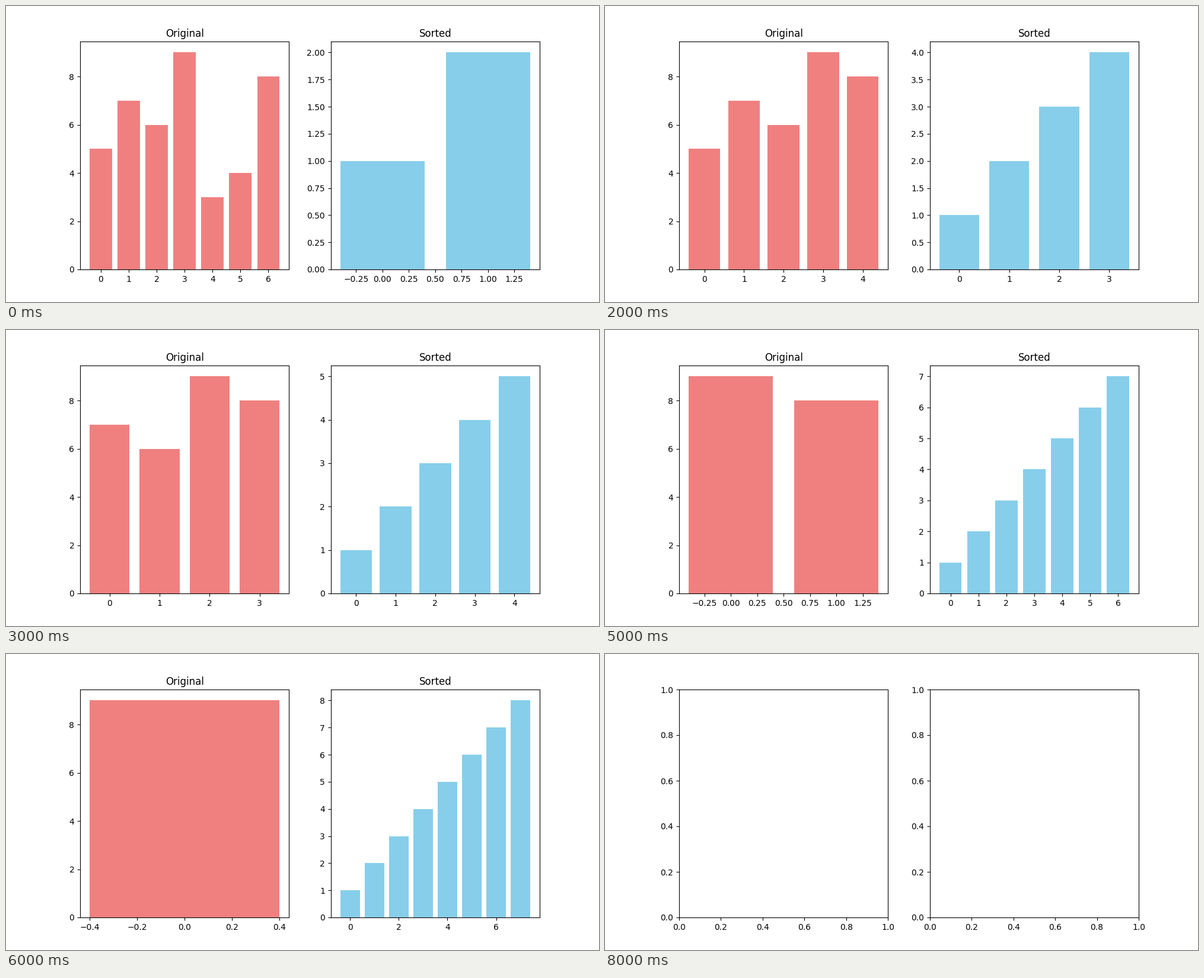
A matplotlib script for the animation above (9 s loop, 1000 by 500 pixels).

```python
import matplotlib.pyplot as plt
from matplotlib.animation import FuncAnimation

VALUES = [5, 7, 6, 9, 3, 4, 8]
TOP = max(VALUES)
STEPS = TOP - 1          # one value moves across per step
FRAMES = STEPS + 1       # plus a closing pair of blank axes

fig, (left, right) = plt.subplots(1, 2, figsize=(10, 5), dpi=100)


def draw_bars(ax, heights, color, title):
    ax.bar(range(len(heights)), heights, color=color)
    ax.set_title(title)


def update(i):
    left.clear()
    right.clear()
    if i == STEPS:
        return
    moved = i + 2
    rest = [v for v in VALUES if v > moved]
    draw_bars(left, rest, "lightcoral", "Original")
    draw_bars(right, range(1, moved + 1), "skyblue", "Sorted")
    if not rest:
        # keep the span of the last bar, with the usual 5% margins
        left.set_xlim(-0.44, 0.44)
        left.set_ylim(-0.05 * TOP, 1.05 * TOP)


anim = FuncAnimation(fig, update, frames=FRAMES, init_func=lambda: update(0),
                     interval=1000, repeat=True, repeat_delay=0)
plt.show()
```
